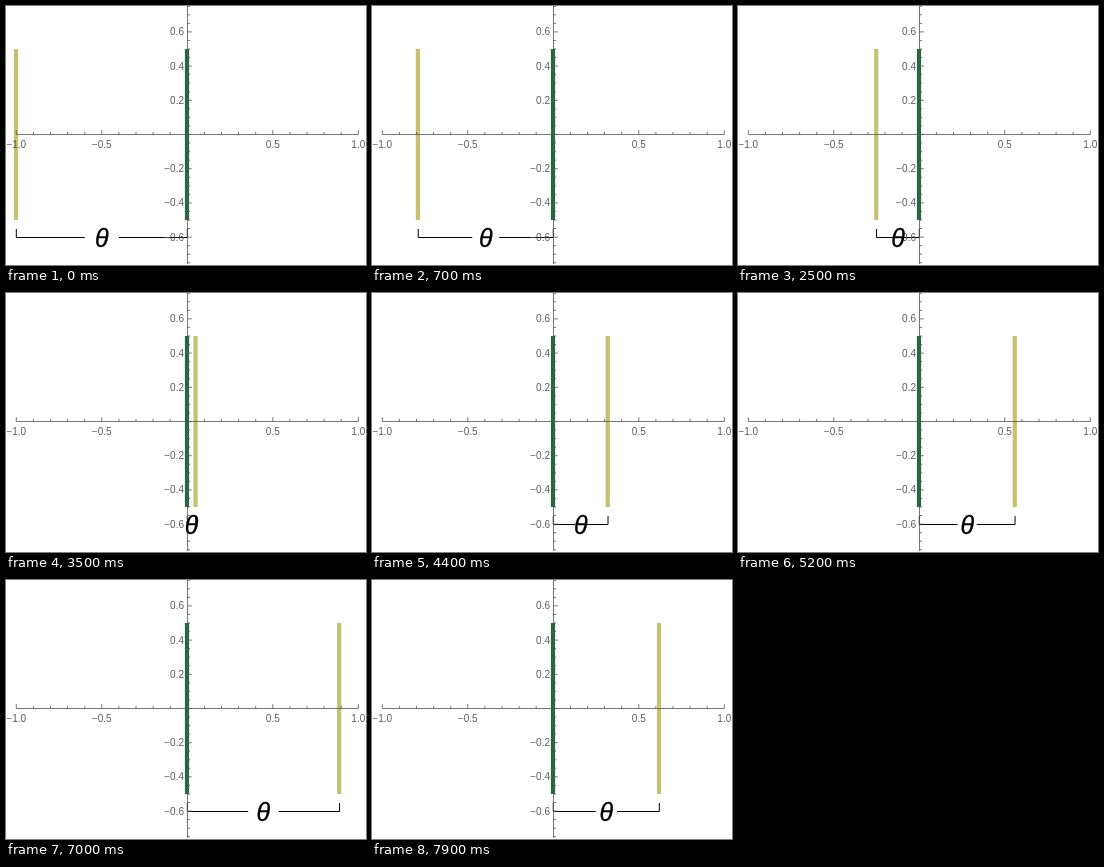
An HTML page for the animation above (8000 ms loop, 360 by 259 pixels).

```html
<!DOCTYPE html>
<html lang="en">
<head>
<meta charset="utf-8">
<title>Moving line</title>
<style>
html, body { margin: 0; width: 100%; height: 100%; overflow: hidden; background: #fff; }
svg { display: block; }
.label { font: 10px "Liberation Sans", Arial, sans-serif; fill: #5c5c5c; }
.theta { font: italic 25px "Liberation Sans", Arial, sans-serif; text-anchor: middle; fill: #000; stroke: #000; stroke-width: .3; }
</style>
</head>
<body>
<svg id="stage" width="360" height="259" viewBox="0 0 360 259"></svg>
<script>
const stage = document.getElementById("stage");
const X0 = 181.3, Y0 = 128.5, UNIT = 171;
const STEP = 100, LOOP = 8000, LAST = 66;
const px = v => X0 + UNIT * v;
const py = v => Y0 - UNIT * v;

function add(tag, attrs, text) {
  const el = document.createElementNS("http://www.w3.org/2000/svg", tag);
  for (const k in attrs) el.setAttribute(k, attrs[k]);
  if (text) el.textContent = text;
  return stage.appendChild(el);
}
const path = (d, stroke, width) =>
  add("path", { d, stroke, "stroke-width": width, fill: "none" });
const label = (v, x, y, anchor) =>
  add("text", { class: "label", x, y, "text-anchor": anchor }, v.toFixed(1).replace("-", "\u2212"));

const span = `V${py(-0.5)}`;
const bar = path("", "#c8c06e", 4.2);
path(`M181 ${py(0.5)}${span}`, "#1f6b3d", 4.2);
const bracket = path("", "#000", 1);

// Axes with major and minor ticks
let axes = `M${px(-1)} ${Y0}H${px(1)}M181.5 0V258`;
for (let i = -10; i <= 10; i++) {
  const major = i % 5 === 0;
  axes += `M${px(i / 10)} ${Y0}v${major ? -4.3 : -2.6}`;
  if (major && i) label(i / 10, px(i / 10), 141.5, "middle");
}
for (let i = -15; i <= 15; i++) {
  const major = i % 4 === 0;
  axes += `M181.5 ${py(i / 20)}h${major ? 4.3 : 2.6}`;
  if (major && i) label(i / 20, 178, py(i / 20) + 3.4, "end");
}
path(axes, "#555", 0.8);
const theta = add("text", { class: "theta", y: 240.5 }, "θ");

function draw(ms) {
  const n = Math.floor((ms % LOOP) / STEP);
  const k = n <= LAST ? n : 2 * LAST + 1 - n;
  const v = -1 + 0.03 * k;
  const x = px(v), y = 231.5;
  bar.setAttribute("d", `M${x - 0.3} ${py(0.5)}${span}`);
  bracket.setAttribute("d",
    `M${x} 223V${y}H${px(v * 0.6)}M${px(v * 0.4)} ${y}H${X0}V223`);
  theta.setAttribute("x", px(v / 2));
}

const start = performance.now();
function frame() {
  draw(performance.now() - start);
  requestAnimationFrame(frame);
}
draw(0);
requestAnimationFrame(frame);
</script>
</body>
</html>
```
